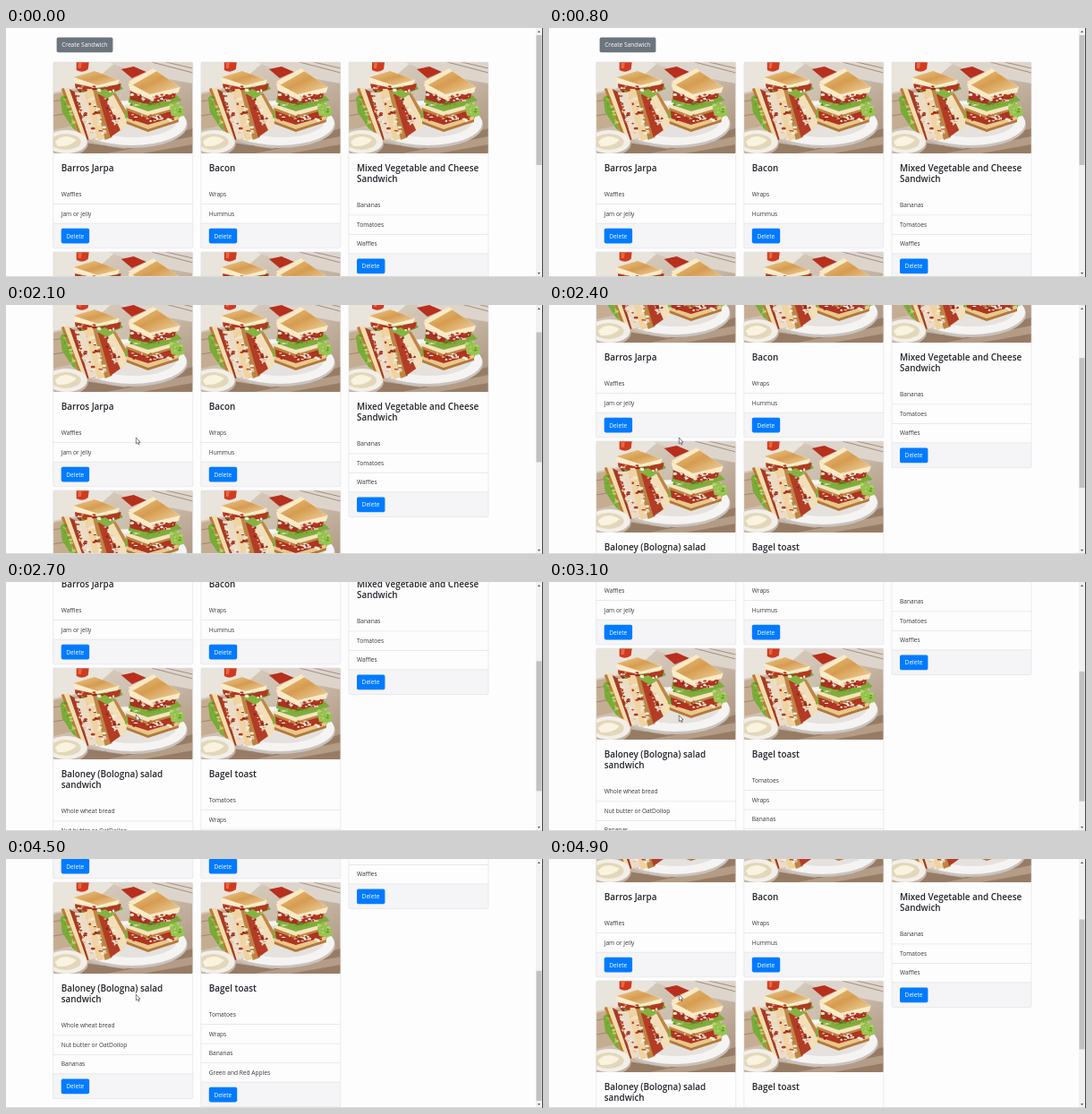
Recreate the animation shown at these times as an HTML page. Size 600 by 278 pixels, loop 5 s.

```html
<!DOCTYPE html>
<html lang="en">
<head>
<meta charset="utf-8">
<title>Sandwich list</title>
<style>
html, body { margin: 0; width: 100%; height: 100%; overflow: hidden; background: #fefdfe; }
svg { display: block; width: 100vw; height: 100vh; }
text { font-family: "Open Sans", "Noto Sans", sans-serif; font-size: 6.6px; fill: #33373b; }
.title { font-size: 9.9px; font-weight: 600; fill: #212529; }
.label { fill: #fff; }
</style>
</head>
<body>
<svg id="stage" viewBox="0 0 600 278">
  <defs>
    <linearGradient id="wood" x2="1" y2="1">
      <stop offset="0" stop-color="#d9cfc4"/>
      <stop offset=".45" stop-color="#cdbfae"/>
      <stop offset="1" stop-color="#a58c76"/>
    </linearGradient>
    <linearGradient id="toast" x2="1" y2="1">
      <stop offset="0" stop-color="#edca8c"/>
      <stop offset=".5" stop-color="#d69c50"/>
      <stop offset="1" stop-color="#f0d7a6"/>
    </linearGradient>
    <clipPath id="crop"><rect width="156" height="102" rx="1.5"/></clipPath>
    <g id="photo" clip-path="url(#crop)">
      <rect width="156" height="102" fill="url(#wood)"/>
      <path d="M0 0H70L40 26L0 34Z" fill="#e9e4dc"/>
      <path d="M62 0H156V24L92 12Z" fill="#ddd5cc"/>
      <path d="M0 36L30 30L26 70L0 76Z" fill="#c5ad92"/>
      <path d="M110 0L156 12M126 0L156 7M0 44L24 40M0 60L24 56M108 102L156 84M30 102L62 92" stroke="#967c66" stroke-width=".8"/>
      <path d="M36 90L80 97L156 74V102H30Z" fill="#977c65"/>
      <path d="M60 102L156 83V92L100 102Z" fill="#b49c86"/>
      <!-- plate -->
      <ellipse cx="88" cy="70" rx="62" ry="26" fill="#c9c2be"/>
      <ellipse cx="88" cy="68" rx="61" ry="25" fill="#f5f4f3"/>
      <ellipse cx="90" cy="66" rx="48" ry="18" fill="#e5e1de"/>
      <!-- tomatoes -->
      <path d="M26 0H40L39 8Q33 13 26 9Z" fill="#cf3b20"/>
      <path d="M28 1H32L31 7H28Z" fill="#e8683f"/>
      <!-- flat sandwich behind -->
      <path d="M24 26L30 34L58 38L78 30L74 24Z" fill="#74a637"/>
      <path d="M24 22L50 30L76 24L74 31L50 37L25 29Z" fill="#b33821"/>
      <path d="M22 18L44 10L74 20L72 25L48 29L24 24Z" fill="#fbeccb"/>
      <path d="M23 17L46 10L73 20L50 26Z" fill="url(#toast)"/>
      <!-- left wedges -->
      <path d="M8 40L18 30L24 60L34 82L22 74L10 56Z" fill="#79ab38"/>
      <path d="M9 30L18 28L38 86L28 80Z" fill="#f3dcae"/>
      <path d="M9 30L12 29L32 82L28 80Z" fill="#b97c38"/>
      <path d="M18 30L40 42L54 84L38 87Z" fill="#a53a25"/>
      <path d="M24 34L52 34L62 82L40 87Z" fill="#ecdcc6"/>
      <path d="M34 30L46 30L60 85L50 88Z" fill="#efd3a0"/>
      <path d="M44 29L50 32L66 84L58 87Z" fill="#bd8544"/>
      <path d="M50 36L60 34L78 74L64 84Z" fill="#b33c26"/>
      <path d="M56 34L68 35L86 66L76 78Z" fill="#f2dfb9"/>
      <path d="M66 34L70 35L88 65L85 69Z" fill="#bf8744"/>
      <path d="M48 34L58 30L68 36L60 41Z" fill="#84b342"/>
      <!-- right stack -->
      <path d="M80 62L104 72L140 64L145 52L132 44L82 50Z" fill="#7fae3e"/>
      <path d="M82 62L106 69L140 60V66L106 77L82 68Z" fill="#e9c78b"/>
      <path d="M82 66L106 75L140 64V67L106 78L82 69Z" fill="#b3793a"/>
      <path d="M83 53L106 62L139 53L137 61L106 70L84 63Z" fill="#af3421"/>
      <path d="M82 47L106 55L140 46V51L106 62L82 53Z" fill="#f6e4bc"/>
      <path d="M82 51L106 60L140 50V52L106 63L82 54Z" fill="#bd8341"/>
      <path d="M86 35L108 44L138 37L144 43L108 51L84 45Z" fill="#7cab38"/>
      <path d="M86 31L108 38L138 30L136 40L108 48L86 42Z" fill="#a93222"/>
      <path d="M84 24L112 8L142 28L140 34L108 42L86 32Z" fill="#fbebc8"/>
      <path d="M84 23L112 8L142 28L108 36Z" fill="url(#toast)"/>
      <path d="M84 22L112 7L116 10L88 26Z" fill="#fae9c4"/>
      <path d="M76 8L90 5L104 11L88 18Z" fill="#b82f1d"/>
      <path d="M130 50Q142 42 146 53T132 60Z" fill="#98c452"/>
      <g id="bits"></g>
      <!-- dip bowl -->
      <ellipse cx="15" cy="91" rx="24" ry="14" fill="#c1b4a7"/>
      <ellipse cx="15" cy="89" rx="23" ry="13" fill="#f3efe8"/>
      <ellipse cx="14" cy="89" rx="17" ry="9" fill="#e3d7bb"/>
      <path d="M2 89Q12 78 26 87Q19 95 5 94Z" fill="#f9f3df"/>
    </g>
  </defs>

  <rect width="600" height="278" fill="#fefdfe"/>
  <g id="page"></g>

  <rect x="592" width="7" height="278" fill="#f1f1f1"/>
  <rect id="thumb" x="592.5" width="6" height="145" fill="#c1c1c1"/>
  <path d="M594 5L595.5 3L597 5Z" fill="#505050"/>
  <path d="M594 273L595.5 275L597 273Z" fill="#505050"/>
  <rect x="599" width="1" height="278" fill="#444"/>
  <rect y="277" width="599" height="1" fill="#d9dcd9"/>
  <path id="cursor" d="M0 0V7L1.6 5.6L2.7 8L3.7 7.5L2.7 5.2H4.7Z" fill="#fff" stroke="#333" stroke-width=".6"/>
</svg>
<script>
const NS = "http://www.w3.org/2000/svg";
const LOOP = 5000, STEP = 100;
const VIEW = 278, PAGE = 502, TRACK = 262;
const COLS = [52.7, 217.8, 383];
const CARD_W = 156, PHOTO_H = 102, ROW = 21.5, FOOT = 27.7;

const CARDS = [
  { col: 0, top: 38, title: ["Barros Jarpa"], items: ["Waffles", "Jam or jelly"] },
  { col: 1, top: 38, title: ["Bacon"], items: ["Wraps", "Hummus"] },
  { col: 2, top: 38, title: ["Mixed Vegetable and Cheese", "Sandwich"], items: ["Bananas", "Tomatoes", "Waffles"] },
  { col: 0, top: 250, title: ["Baloney (Bologna) salad", "sandwich"], items: ["Whole wheat bread", "Nut butter or OatDollop", "Bananas"] },
  { col: 1, top: 250, title: ["Bagel toast"], items: ["Tomatoes", "Wraps", "Bananas", "Green and Red Apples"] }
];

// time in ms, scroll offset in px
const SCROLL = [
  [1800, 0], [2100, 43], [2400, 98], [2700, 154], [3000, 176],
  [3400, 176], [3700, 209], [4000, 224], [4500, 224], [4900, 114]
];
const CURSOR_Y = [[2100, 148], [2700, 148], [3700, 150], [4500, 151]];

const $ = id => document.getElementById(id);

function add(parent, tag, attrs, text) {
  const el = document.createElementNS(NS, tag);
  for (const k in attrs) el.setAttribute(k, attrs[k]);
  if (text) el.textContent = text;
  parent.append(el);
  return el;
}

function button(x, y, w, fill, text) {
  add($("page"), "rect", { x, y, width: w, height: 16.6, rx: 1.8, fill });
  add($("page"), "text", { x: x + 5.6, y: y + 10.7, class: "label" }, text);
}

function card({ col, top, title, items }) {
  const page = $("page"), x = COLS[col], tx = x + 9;
  const first = top + 147.6 + (title.length - 1) * 12.3;
  const foot = first + (items.length - 1) * ROW + 11;
  const line = y => add(page, "rect", { x, y, width: CARD_W, height: .6, fill: "#dcdcde" });

  add(page, "rect", { x, y: foot, width: CARD_W, height: FOOT, fill: "#f5f4f6" });
  add(page, "use", { href: "#photo", transform: `translate(${x} ${top})` });
  title.forEach((s, i) =>
    add(page, "text", { x: tx, y: top + 121.5 + i * 12.3, class: "title" }, s));
  items.forEach((s, i) => {
    const y = first + i * ROW;
    add(page, "text", { x: tx, y: y + 2.5 }, s);
    line(y + 10.7);
  });
  add(page, "rect", {
    x, y: top, width: CARD_W, height: foot + FOOT - top, rx: 1.8,
    fill: "none", stroke: "#dfdfe1", "stroke-width": .6
  });
  button(tx, foot + 5.7, 31.4, "#007bff", "Delete");
}

// crumbs of filling inside a slanted band
let seed = 7;
const rand = () => (seed = seed * 16807 % 2147483647) / 2147483647;
function scatter(x, y, w, h, slant, count, colors) {
  for (let i = 0; i < count; i++) {
    const v = rand();
    add($("bits"), "ellipse", {
      cx: x + rand() * w + v * slant, cy: y + v * h,
      rx: .8 + rand() * 1.8, ry: .6 + rand() * 1.1,
      fill: colors[Math.floor(rand() * colors.length)]
    });
  }
}

function at(table, t) {
  if (t <= table[0][0]) return table[0][1];
  for (let i = 1; i < table.length; i++) {
    const [t0, a] = table[i - 1], [t1, b] = table[i];
    if (t <= t1) return a + (b - a) * (t - t0) / (t1 - t0);
  }
  return table[table.length - 1][1];
}

function draw(now) {
  const t = Math.floor((now % LOOP) / STEP) * STEP;
  const y = Math.round(at(SCROLL, t));
  $("page").setAttribute("transform", `translate(0 ${-y})`);
  $("thumb").setAttribute("y", 8 + y / PAGE * TRACK);
  $("cursor").setAttribute("transform", `translate(145.3 ${at(CURSOR_Y, t)})`);
  $("cursor").setAttribute("visibility", t < 1900 ? "hidden" : "visible");
  requestAnimationFrame(draw);
}

const MEAT = ["#f0dfcb", "#e2c4a4", "#b8371f", "#8c2a1a", "#f6ecdf"];
const LEAF = ["#8fbd45", "#5f8f2a", "#b4d36c"];
scatter(21, 38, 8, 42, 18, 30, MEAT);
scatter(38, 40, 8, 40, 14, 26, MEAT);
scatter(54, 40, 8, 32, 16, 26, MEAT);
scatter(88, 36, 46, 8, 0, 30, MEAT);
scatter(86, 58, 48, 8, 0, 32, MEAT);
scatter(28, 26, 42, 8, 0, 16, MEAT);
scatter(8, 36, 6, 34, 12, 14, LEAF);
scatter(86, 45, 52, 3, 0, 12, LEAF);
scatter(134, 46, 9, 11, 0, 10, LEAF);

button(56.6, 10.6, 62.8, "#6c757d", "Create Sandwich");
CARDS.forEach(card);
draw(0);
</script>
</body>
</html>
```
